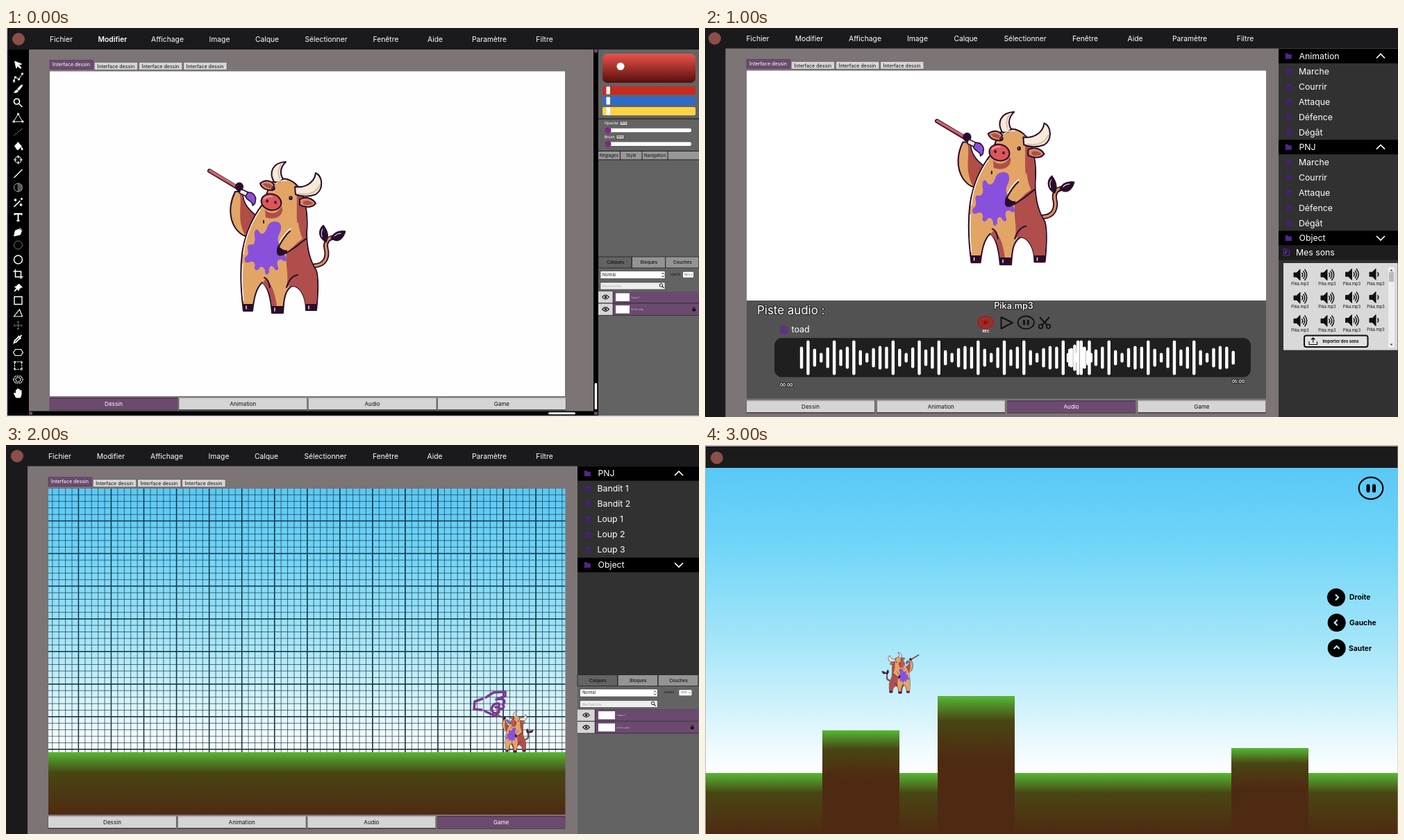
An HTML page that plays this animation: 998x561 px, repeating every 4000 ms.

```html
<!DOCTYPE html>
<html lang="fr">
<head>
<meta charset="utf-8">
<title>Interface dessin</title>
<style>
html, body { margin: 0; width: 100%; height: 100%; overflow: hidden; background: #1a1a1c; }
svg { position: absolute; inset: 0; width: 100%; height: 100%; display: block; }
text { font-family: Inter, "Noto Sans", sans-serif; white-space: pre; }
.scene { visibility: hidden; animation: show 4s step-end infinite; }
#draw { animation-delay: 0s; }
#audio { animation-delay: -3s; }
#game { animation-delay: -2s; }
#play { animation-delay: -1s; }
@keyframes show { 0% { visibility: visible; } 25%, 100% { visibility: hidden; } }
.halo { paint-order: stroke; stroke: #222; stroke-width: 2px; stroke-linejoin: round; }
</style>
</head>
<body>
<svg viewBox="0 0 998 561" preserveAspectRatio="none">
  <defs>
    <linearGradient id="sky" x2="0" y2="1">
      <stop stop-color="#5ac8f6"/><stop offset=".25" stop-color="#70d5f8"/>
      <stop offset=".6" stop-color="#a9e7f9"/><stop offset="1" stop-color="#fff"/>
    </linearGradient>
    <linearGradient id="soil" x2="0" y2="1">
      <stop stop-color="#56b835"/><stop offset=".33" stop-color="#484613"/><stop offset="1" stop-color="#4f2a12"/>
    </linearGradient>
    <linearGradient id="block" x2="0" y2="1">
      <stop stop-color="#56b835"/><stop offset=".18" stop-color="#484613"/><stop offset=".46" stop-color="#4f2a12"/>
    </linearGradient>
    <linearGradient id="red" x2="0" y2="1">
      <stop stop-color="#e9534c"/><stop offset="1" stop-color="#560e0b"/>
    </linearGradient>
    <g id="bull" fill="none" stroke="#2a0c2c" stroke-width="2" stroke-linejoin="round" stroke-linecap="round">
      <path stroke-width="7" d="M444 343C460 342 464 330 461 318C459 308 464 303 472 302"/>
      <path stroke="#d98d5c" stroke-width="3.4" d="M444 343C460 342 464 330 461 318C459 308 464 303 470 302"/>
      <path fill="#2a0c2c" stroke-width="1" d="M461 309C448 302 450 290 457 284C463 292 466 300 461 309ZM468 303C472 293 482 292 489 293C486 304 478 312 468 303Z"/>
      <path stroke="#fff" stroke-width="1" d="M455 301Q453 294 456 290M473 300Q477 296 482 296"/>
      <path fill="#e2a566" d="M330 236C322 252 320 272 330 288C335 295 340 299 345 300C352 290 358 282 361 271C348 262 340 250 341 236Z"/>
      <path fill="#b04e45" stroke="none" d="M337 240C340 256 332 276 344 298C352 290 358 282 360 271C350 264 340 253 341 240Z"/>
      <path stroke-width="6" d="M293 206L338 233"/>
      <path stroke="#cf5a5a" stroke-width="3.2" d="M293 206L337 232"/>
      <path stroke="#f0a09a" stroke-width=".8" d="M294 205L330 226"/>
      <ellipse cx="336" cy="229" rx="6" ry="6.5" fill="#2a0c2c" stroke="none"/>
      <path fill="#eee6e6" stroke-width="1.5" d="M338 232L349 237L346 243L336 238Z"/>
      <path fill="#8a50d8" stroke-width="1.5" d="M348 237C357 236 361 244 359 250Q359 254 355 256C356 249 347 250 345 243Z"/>
      <path fill="#e2a566" d="M371 252C354 274 344 298 340 325C337 350 338 378 342 408L355 408C357 390 360 375 369 367C376 372 381 384 383 411L399 411C400 390 402 378 412 372C424 372 432 388 432 407L447 407C449 388 451 365 447 350C437 335 433 315 433 295C436 262 428 236 420 228C408 214 390 214 380 226Z"/>
      <path fill="#b04e4b" stroke="none" d="M417 227C422 250 414 280 425 304L404 325C402 345 408 356 404 373L412 372C424 372 432 388 432 406L446 406C448 388 450 365 446 350C436 335 432 315 432 295C435 262 427 237 417 227Z"/>
      <path fill="#b04e4b" stroke="none" d="M369 368C376 372 382 384 383 402L390 402C388 382 382 368 374 362ZM373 262C380 270 392 268 397 257C402 268 390 279 374 273Z"/>
      <path fill="#2a0c2c" stroke="none" d="M341 398L356 398L355 408L342 408ZM382 401L400 401L399 411L383 411ZM431 398L448 398L447 408L432 408Z"/>
      <path stroke="#fff" stroke-width="1.3" d="M366 262C351 284 344 304 342 326M341 340Q339 365 342 393M346 401V405M387 404V408M436 401V405"/>
      <path fill="#8950dc" stroke="none" d="M359 292C364 286 364 300 371 296C378 291 374 281 386 279C398 278 398 290 393 298C388 308 398 318 403 330C406 337 401 338 397 334C389 333 390 340 392 345C393 350 388 351 386 346C382 340 378 345 379 351C378 357 373 357 373 351C373 344 366 343 365 346C363 351 357 350 358 345C360 338 355 335 350 338C344 340 342 335 345 330C352 326 347 318 348 315C350 309 356 316 358 309C360 303 356 297 359 292Z"/>
      <path fill="#e2a566" stroke="none" d="M410 289L393 312Q391 321 402 322L427 304Q422 292 421 280Z"/>
      <path stroke="#fff" stroke-width="1.3" d="M410 289Q401 296 394 309"/>
      <path d="M409 293Q401 300 393 315M403 325Q418 316 432 304M371 278L371 281M404 374Q409 358 420 356M380 374Q378 362 372 360"/>
      <path fill="#2a0c2c" stroke-width="1" d="M392 314Q398 322 405 321Q401 329 393 328Q388 325 392 314Z"/>
      <path fill="#d98d5c" d="M384 234C376 234 368 232 366 224C374 218 382 220 386 226ZM423 247C432 242 442 246 446 253C440 261 428 258 423 255Z"/>
      <path fill="#b04e4b" stroke="none" d="M381 231Q373 230 370 225Q377 222 383 227ZM428 250Q436 247 442 253Q436 257 428 254Z"/>
      <path fill="#f6ead8" d="M386 222C378 208 384 194 403 193C397 199 393 208 399 218Q393 224 386 222ZM416 229C430 231 444 224 446 209C456 214 458 232 446 240C436 244 424 243 417 240Z"/>
      <path stroke="#d9bfa6" stroke-width="2" d="M394 217Q390 206 396 197M422 239Q444 243 452 226"/>
      <ellipse cx="382" cy="251" rx="14.5" ry="11.5" fill="#dc565b" transform="rotate(14 382 251)"/>
      <path stroke="#f39a97" stroke-width="2" d="M372 246Q376 242 383 243"/>
      <path stroke-width="3.4" d="M376 249L376.4 250M388 251L388 252"/>
      <path stroke-width="5.4" d="M385 231V231.5M410 245V245.5"/>
      <path stroke="#fff" stroke-width="1.2" d="M384.5 230.5V230.6M409.5 244.5V244.6M389 224Q396 219 404 220"/>
    </g>
  </defs>
  <g id="draw" class="scene"></g>
  <g id="audio" class="scene"></g>
  <g id="game" class="scene"></g>
  <g id="play" class="scene"></g>
</svg>
<script>
const BAR = '#1a1a1c', DESK = '#7c7475', PLUM = '#6c4a70', GREY = '#636363', LIGHT = '#d6d5d6', DARK = '#313131';

const rect = (x, y, w, h, fill, more = '') =>
  `<rect x="${x}" y="${y}" width="${w}" height="${h}" fill="${fill}" ${more}/>`;
const path = (d, stroke, w = 1, fill = 'none', more = '') =>
  `<path d="${d}" stroke="${stroke}" stroke-width="${w}" fill="${fill}" ${more}/>`;
const disc = (x, y, r, fill, more = '') => `<circle cx="${x}" cy="${y}" r="${r}" fill="${fill}" ${more}/>`;
// y is the middle of the line
const text = (x, y, s, size, fill = '#fff', more = '') =>
  `<text x="${x}" y="${y + size * .364}" font-size="${size}" fill="${fill}" ${more}>${s}</text>`;
const mid = (x, y, s, size, fill, more = '') => text(x, y, s, size, fill, 'text-anchor="middle" ' + more);
const at = (x, y, body, more = '') => `<g transform="translate(${x} ${y})" ${more}>${body}</g>`;
const bull = m => `<use href="#bull" transform="matrix(${m})"/>`;
const logo = (x, y) => disc(x, y, 9, '#8a5048');
const put = (id, ...parts) => document.getElementById(id).innerHTML = parts.flat().join('');

const MENU = ['Fichier', 'Modifier', 'Affichage', 'Image', 'Calque', 'Sélectionner', 'Fenêtre', 'Aide', 'Paramètre', 'Filtre'];
const menu = (xs, y, active) => MENU.map((s, i) =>
  mid(xs[i], y, s, 10.3, '#fff', i === active ? 'font-weight="600"' : ''));

const docTabs = (x, y) => [0, 1, 2, 3].map(i => {
  const left = x + i * 64.2, on = !i;
  return rect(left, on ? y : y + 3, 62.5, on ? 13 : 11, on ? PLUM : LIGHT, `stroke="${on ? '#543a58' : '#5e5858'}" stroke-width=".7"`) +
    mid(left + 31, on ? y + 6.3 : y + 9.2, 'Interface dessin', 7.1, on ? '#fff' : '#111');
});

const modes = (x, y, step, active) => ['Dessin', 'Animation', 'Audio', 'Game'].map((s, i) => {
  const on = i === active, left = x + i * step;
  return rect(left - .5, y + 1, 185, 18, '#544d50') + rect(left, y, 184, 17, on ? PLUM : LIGHT) +
    rect(left, y, 184, 1.5, on ? '#533757' : '#bab8ba') +
    mid(left + 92, y + 8.7, s, 8.1, on ? '#fff' : '#111');
});

const eye = (x, y) => at(x, y, path('M-4.8 0Q0-6 4.8 0Q0 6-4.8 0Z', '#111', 1.2) + disc(0, 0, 1.7, '#111'));

function layers(x0, w, y) {
  const X = v => x0 + v * w / 145, W = v => v * w / 145;
  const tabs = ['Calques', 'Bloques', 'Couches'].map((s, i) =>
    rect(X(i * 48.4), y, W(48), 16, i ? '#949494' : GREY, 'stroke="#222" stroke-width=".8"') +
    mid(X(i * 48.4 + 24.5), y + 8, s, 6.3, '#111', 'font-weight="500"'));
  const row = (top, name) => rect(x0, top, W(145), 17, '#2c2030') + rect(x0, top, W(20.7), 16.3, LIGHT) +
    rect(X(21.5), top, W(123.5), 16.3, PLUM) + eye(X(10.5), top + 8) +
    rect(X(25), top + 2.5, W(20), 11.5, '#fff') + text(X(47), top + 8.7, name, 3.2, '#cdbccf');
  return [tabs,
    rect(X(3), y + 20.5, W(93), 11, '#fff', 'stroke="#333" stroke-width=".6"'), text(X(6), y + 25.8, 'Normal', 5.5, '#111'),
    at(X(93), y + 26, path('M-1.5-1L0-3 1.5-1M-1.5 1L0 3 1.5 1', '#111', .8)),
    text(X(103.5), y + 25.5, 'Opacité :', 4, '#111'),
    rect(X(122), y + 21.7, W(15), 8, '#fff', 'rx="1"'), mid(X(128), y + 25.7, '100%', 3.4, '#333'),
    at(X(134.5), y + 25.7, path('M-1-.6L0 .7 1-.6', '#111', .6)),
    rect(X(3), y + 37, W(93), 10, '#eee', 'stroke="#444" stroke-width=".6"'), text(X(6), y + 42.3, 'Recherche', 5.4, '#aaa'),
    at(X(91), y + 41.5, path('M.9.9L3.4 3.4', '#111', 1.2) + disc(-.6, -.6, 2.2, 'none', 'stroke="#111"')),
    row(y + 50, 'Calque 1'), row(y + 67.6, 'Arrière-plan'),
    at(X(137.7), y + 75.5, rect(-2.3, -.6, 4.6, 3.6, '#111') + path('M-1.4-.4V-2Q0-4 1.4-2V-.4', '#111', .9))];
}

const folder = (x, y) => path(`M${x - 4.5} ${y + 4}v-8h3.5l1 1.5h4.5v6.500z`, 'none', 0, '#532587');
const file = (x, y, k = 1) => at(x, y, path('M-3-4H1.500L3.500-2V4H-3Z', 'none', 0, '#4b2179') +
  path('M-1.500 0H2M-1.500 2H2', '#35165a', .7), `transform-origin="0 0" style="scale:${k}"`);
const chevron = (x, y, up) => path(up ? `M${x - 6} ${y + 3}l6-6 6 6` : `M${x - 6} ${y - 3}l6 6 6-6`, '#fff', 1.7);

// a folder heading and its items
const group = (x, y, name, items, open, arrow, w, dx = 0) => [
  rect(x, y - 10.5, w, 21, '#000'), folder(x + 14.3, y), text(x + 29.5, y, name, 12.3), chevron(arrow, y, open),
  items.map((s, i) => file(x + 15, y + 22 * (i + 1)) + text(x + 29 + dx, y + 22 * (i + 1), s, 12.3))];

// ---- drawing screen
const TOOLS = [
  [53, 'M-5-5L5-1 .8 0 4.500 4.500 3 5.500-.8 1.600-2.600 5Z', 1],
  [72, 'M-7 5L-4-1 1 2 4-3 7-6M-7 3h2v3h-2zM-5-2h2v2h-2zM0 1h2v2H0zM5-7h2v2H5z'],
  [88, 'M6-6Q7-5 1 2L-1 0Q5-7 6-6ZM-2 1L0 3Q-1 6-6 5Q-4 4-4 2.500Z', 1],
  [108, 'M1.500 1.500L6 6M-6-2a4 4 0 1 0 8 0a4 4 0 1 0-8 0', 0, 1.700],
  [130, 'M0-6L6.500 5H-6.500ZM-1-7H1V-5H-1ZM-7.500 4h2v2h-2zM5.500 4h2v2h-2z'],
  [150, 'M-6 5L6-5', 0, 1, '1.2 1.600'],
  [170, 'M-5 0L0-5 5 1-1 6ZM-1-6L2-2M5 2Q8 6 5.500 6Q4 6 5 2', 1],
  [190, 'M-4.500 0a4.500 4.500 0 1 0 9 0a4.500 4.500 0 1 0-9 0M0-6.500V-2M0 2V6.500M-6.500 0H-2M2 0H6.500', 0, 1.2],
  [210, 'M-6 6L6-6', 0, 1.4],
  [230, 'M-6 0a6 6 0 1 0 12 0a6 6 0 1 0-12 0M0-6V6M2-5V5M4-4V4', 0, 1, '', '#aaa'],
  [252, 'M-6 6L3-3M-4-6V-2M-6-4H-2M5-7V-4M3.500-5.500H6.500M4 1V5M2 3H6', 0, 1.700],
  [273, 'M-5-3V-5H5V-3M0-5V5M-2 5H2', 0, 2],
  [294, 'M-6 6L-4-2 2-4 5-1 3 4ZM2-6L6-2', 1],
  [313, 'M-6 0a6 6 0 1 0 12 0a6 6 0 1 0-12 0', 0, 1, '', '#777'],
  [334, 'M-6 0a6 6 0 1 0 12 0a6 6 0 1 0-12 0', 0, 1.500],
  [355, 'M-4-7V4H7M-7-4H4V7', 0, 1.500],
  [374, 'M1-5L6 0 4 0 1 3 1 5-1.500 2.500-5 6-5.500 5.500-2.500 1.500-5-1-3-1 0-4Z', 1],
  [393, 'M-5.500-5.500H5.500V5.500H-5.500Z', 0, 1.4],
  [411, 'M-6 5H6L2-5Z', 0, 1.2],
  [429, 'M0-6V6M-6 0H6M-1.500-4.500L0-6 1.500-4.500M-1.500 4.500L0 6 1.500 4.500M-4.500-1.500L-6 0-4.500 1.500M4.500-1.500L6 0 4.500 1.500', 0, .9, '2 1', '#aaa'],
  [448, 'M-6 6L-5 3 1-3 3-1-3 5ZM0-4L4 0M2-2L5-5', 0, 1.8],
  [468, 'M-7 0L-4-4.500H4L7 0 4 4.500H-4Z', 0, 1.2],
  [487, 'M-5-5.500H5L5.500 5-5 5.500ZM-6-6h2v2h-2zM4-6h2v2H4zM-6 4h2v2h-2zM4 4h2v2H4z', 0, 1, '2.500 1'],
  [507, 'M-7 0L-4-5H4L7 0 4 5H-4ZM-4 0L-2-3H2L4 0 2 3H-2Z', 0, 1.1, '3 .7'],
  [527, 'M-3 6L-6 0-5-1-3 1-3-5H-1.800V-1L-1.200-6.500H0V-1L1-6H2.200V-1L3.500-4.500H4.500V2L3 6Z', 1]
];
const tools = TOOLS.map(([y, d, solid, w = 1, dash = '', c = '#fff']) =>
  at(17.5, y, path(d, c, w, solid ? c : 'none', `stroke-dasharray="${dash || 'none'}"`)));

const slider = (y, name) => [text(862, y, name, 5.4),
  rect(name === 'Brush' ? 879 : 884, y - 3, 11, 6, '#ccc', 'rx="1" stroke="#222" stroke-width=".6"'),
  mid(name === 'Brush' ? 884.5 : 889.5, y, '100%', 3.2, '#111'),
  rect(863, y + 7.5, 124, 5.5, '#fff', 'rx="2.700"'), disc(867, y + 10.3, 4.6, '#7c2a86')];

put('draw',
  rect(0, 0, 998, 561, '#dcd4d6'), rect(2, 0, 996, 559, DESK), rect(2, 0, 996, 31, BAR), logo(18, 16),
  menu([79.5, 153.5, 232.5, 307.5, 376, 461, 547, 618, 696, 775.5], 16.3, 1),
  rect(2, 31, 31, 528, '#000'), tools,
  docTabs(63, 46.3), rect(63, 62.5, 742, 468.5, '#fffefe'), bull('1 0 0 1 0 0'), modes(63, 533, 186.3, 0),
  rect(846, 31, 7, 528, '#000'), rect(33, 552.5, 820, 6.5, '#000'),
  [[847, 31], [33, 553.5], [847, 553.5]].map(([x, y]) => rect(x, y, 5, 4.5, PLUM)),
  rect(847.7, 512, 3.5, 38, '#fff', 'rx="1.500"'), rect(781, 554.3, 39, 3, '#fff', 'rx="1.500"'),
  rect(853, 31, 145, 528, GREY),
  rect(859, 37, 134, 42, 'url(#red)', 'rx="7"'), disc(885, 55.3, 5.5, '#fff'),
  ['#c62b21', '#2e6bd0', '#fbd346'].map((c, i) =>
    rect(859, 84 + 15 * i, 134, 12, c, 'rx="2.500"') + rect(864.5, 84.5 + 15 * i, 5.5, 11, '#fff', 'rx="1"')),
  rect(853, 130.5, 145, 1, '#111'), slider(137.3, 'Opacité'), slider(157, 'Brush'),
  rect(853, 177, 145, 13.5, '#1c1c1c'),
  [['Réglages', 853, 31], ['Style', 885, 30.5], ['Navigation', 916.5, 36], ['', 953.5, 44.5]].map(([s, x, w]) =>
    rect(x, 178, w, 11.5, '#979797') + mid(x + w / 2, 184, s, 6.2, '#111')),
  layers(853, 145, 330));

// ---- audio screen
const CYCLE = [32, 50, 26, 14, 30, 50, 24, 32, 50, 22, 14, 28, 34];
const stick = (x, h) => rect(x - 2.2, 475.5 - h / 2, 4.4, h, '#fff', 'rx="2.200"');
const wave = [...Array(67)].map((_, i) => stick(139 + 9.42 * i, i === 66 ? 20 : CYCLE[i % 13])).join('') +
  [14, 28, 38, 50, 50, 32, 22, 14].map((h, i) => stick(523 + 4.7 * i, h)).join('');

const speaker = (x, y, waves) => at(x, y, path('M-9-3H-5L0-8V8L-5 3H-9Z', '#111', 1, '#111') +
  ['M2.500-3Q5 0 2.500 3', 'M4.500-5.500Q9 0 4.500 5.500', 'M6.500-8Q13 0 6.500 8'].slice(0, waves).map(d => path(d, '#111', 1.5)).join(''));
const sounds = [0, 1, 2].map(r => [857, 896, 931.5, 966].map((x, c) =>
  speaker(x, 356 + 33.2 * r - (c > 1 ? .8 : 0), c === 3 ? 1 : 3) + mid(x, 369 + 33.3 * r - (c === 3 ? .5 : 0), 'Pika.mp3', 5.8, '#111')).join(''));

const ACTS = ['Marche', 'Courrir', 'Attaque', 'Défence', 'Dégât'];
put('audio',
  rect(0, 0, 998, 561, DESK), rect(0, 0, 998, 29.5, BAR), rect(0, 29, 29.5, 532, BAR), logo(14, 15),
  menu([76, 150, 230.5, 306, 375.5, 461, 547.5, 619.5, 698, 778], 15),
  docTabs(60, 45.2), rect(60, 61.5, 748, 332, '#fff'), bull('1.01 0 0 1.01 38.1 -73.9'),
  rect(60, 393, 748, 141.5, '#525252'),
  text(75, 407, 'Piste audio :', 16.9, '#fff', 'class="halo"'),
  mid(444.5, 400, 'Pika.mp3', 12.7, '#fff', 'class="halo" font-weight="500"'),
  '<ellipse cx="404" cy="424.5" rx="10.500" ry="8.500" fill="none" stroke="#c3150f" stroke-width="2.500"/>' +
  '<ellipse cx="404" cy="424.5" rx="6.500" ry="4.800" fill="#c3150f"/>' + disc(404, 424.5, 2, '#6a1512'),
  mid(404.5, 437.3, 'REC', 5, '#fff', 'font-weight="700"'),
  path('M426.500 417L443 425 426.500 433.500Z', '#111', 2, 'none', 'stroke-linejoin="round"'),
  '<ellipse cx="462.300" cy="424.700" rx="11.700" ry="9.200" fill="none" stroke="#111" stroke-width="1.800"/>',
  rect(458, 421, 3, 7.5, '#111', 'rx="1"'), rect(463.7, 421, 3, 7.5, '#111', 'rx="1"'),
  at(489, 425, path('M-7-8L4 4M7-8L-4 4', '#111', 2) + disc(-5.5, 5.5, 2.8, 'none', 'stroke="#111" stroke-width="1.800"') +
    disc(5.5, 5.5, 2.8, 'none', 'stroke="#111" stroke-width="1.800"')),
  path('M108.500 429.500H116L119.500 432.500V441H108.500Z', 'none', 0, '#5d3287'),
  text(124.5, 434.7, 'toad', 12.5),
  rect(100, 447, 686, 56.5, '#1f1f20', 'rx="11"'), wave,
  text(108, 515, '00:00', 6.2, '#fff', 'class="halo" font-weight="600"'),
  text(759, 510, '05:00', 6.2, '#fff', 'class="halo" font-weight="600"'),
  modes(60, 537, 187.8, 2),
  rect(826, 29.5, 172, 532, DARK),
  group(826, 40.5, 'Animation', ACTS, true, 973, 172), group(826, 171.7, 'PNJ', ACTS, true, 973, 172),
  group(826, 303, 'Object', [], false, 973, 172),
  rect(826, 313.5, 172, 21, '#1d1d1e'),
  path('M833 319H839L841.500 321.500V328H833Z', '#6a3aa8', .8, '#2a1145'), path('M836 326V322H838.500', '#9a6ad0', .9),
  text(851, 323.5, 'Mes sons', 12.3),
  rect(833, 339, 164.5, 125.5, '#d9d9d9'), sounds,
  rect(984, 345, 9, 116, '#eee'), rect(985, 352, 7, 14, '#b9b9b9'),
  path('M986.500 350.500L988.500 348 990.500 350.500ZM986.500 455.500L988.500 458 990.500 455.500Z', 'none', 0, '#444'),
  rect(863, 443.5, 91.5, 16.5, '#e2e2e2', 'rx="3" stroke="#111" stroke-width="2"'),
  path('M870 452V456.500H881.500V452M875.700 453.500V447M873 449.500L875.700 446.700 878.500 449.500', '#111', 1.1),
  mid(915.5, 451.7, 'Importer des sons', 5.9, '#111', 'font-weight="700"'));

// ---- level editor
function grid(step, w, x0, y0) {
  let d = '';
  for (let x = x0; x < 805; x += step) d += `M${x.toFixed(2)} 63V443`;
  for (let y = y0; y < 443; y += step) d += `M61 ${y.toFixed(2)}H805.5`;
  return path(d, '#173544', w);
}
put('game',
  rect(0, 0, 998, 561, DESK), rect(0, 0, 998, 30.5, BAR), rect(0, 30, 31, 531, BAR), logo(16, 16),
  menu([77.5, 151, 231.5, 306.5, 375, 460, 546.5, 617.5, 696, 775.5], 16.3),
  docTabs(61, 46.6), rect(61, 63, 744.5, 380, 'url(#sky)'),
  grid(9.41, .7, 66.8, 71.9), grid(47.05, 1.5, 104.4, 109.5),
  rect(61, 443, 744.5, 90, 'url(#soil)'), bull('.27 0 0 .27 627.4 332.2'),
  path('M686 366L675 370 674 381 685 382M690 384L705 391 710 385M691 364L702 357 719 356 719 362 706 367M706 367C718 364 721 371 715 374C720 379 714 382 709 379C712 385 707 388 702 386C696 380 702 371 710 373C712 376 708 379 705 378',
    '#7c3a8e', 3.5, 'none', 'stroke-linejoin="round" stroke-linecap="round"'),
  modes(61, 535, 186.7, 3),
  rect(823, 30.5, 175, 301, DARK), rect(823, 331, 175, 230, GREY),
  group(823, 41, 'PNJ', ['Bandit 1', 'Bandit 2', 'Loup 1', 'Loup 2', 'Loup 3'], true, 969, 175, -.5),
  group(823, 173, 'Object', [], false, 969, 175),
  layers(823, 174, 331.5));

// ---- game preview
const button = (x, y, s, d, tx) => disc(x, y, 13, '#000') + at(x, y, path(d, '#b9edfa', 2.2)) +
  text(tx, y, s, 10.3, '#000', 'font-weight="700"');
put('play',
  rect(0, 0, 998, 561, '#bdb4b4'), rect(1, 2, 996.5, 31, '#1b1b1b'), logo(17, 18.5),
  rect(1, 33, 996.5, 440, 'url(#sky)'), rect(1, 473, 996.5, 88, 'url(#soil)'),
  [[169, 411.5], [335, 362], [758, 437]].map(([x, y]) => rect(x, y, 111, 561 - y, 'url(#block)')),
  bull('-.27 0 0 .27 386.6 247.2'),
  '<ellipse cx="959" cy="62.300" rx="17.300" ry="15.700" fill="none" stroke="#000" stroke-width="2.200"/>',
  rect(952.5, 56.5, 5, 12, '#000', 'rx="2"'), rect(961, 56.5, 5, 12, '#000', 'rx="2"'),
  button(909, 219.7, 'Droite', 'M-1-4L3 0-1 4', 928),
  button(909.7, 256.2, 'Gauche', 'M1-4L-3 0 1 4', 928),
  button(909.7, 293, 'Sauter', 'M-4 1L0-3 4 1', 927));
</script>
</body>
</html>
```
